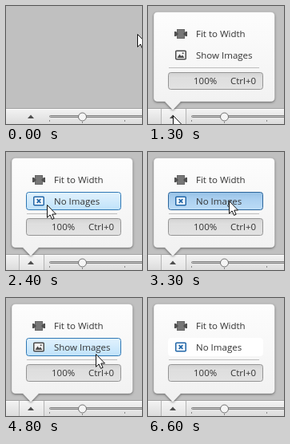
An HTML page that plays this animation: 170 by 148 pixels, repeating every 6900 ms.

```html
<!DOCTYPE html>
<html lang="en">
<head>
<meta charset="utf-8">
<title>Zoom popup</title>
<style>
  html, body { margin: 0; width: 100%; height: 100%; overflow: hidden; background: #c0c0c0; }
  svg { display: block; width: 170px; height: 148px; }
  text { font: 11.5px "Open Sans", "Noto Sans", sans-serif; fill: #333; }
  #bubble { filter: drop-shadow(0 1px 1.5px rgba(0, 0, 0, .5)); }
  .box { stroke: #949494; fill: url(#well); }
  .box.hover { stroke: #5b8db5; fill: url(#soft); }
  #row { stroke: none; fill: none; }
  #row.plain { stroke: #fff; fill: #fff; }
  #row.hover { stroke: #2f78b4; fill: url(#light); }
  #row.hot { stroke: #2b659b; fill: #b9dcf8; }
  #row.press { stroke: #2b659b; fill: url(#blue); }
  .mode { display: none; }
</style>
</head>
<body>
<svg viewBox="0 0 170 148">
  <defs>
    <linearGradient id="bar" x2="0" y2="1">
      <stop stop-color="#f4f4f4"/><stop offset="1" stop-color="#dcdcdc"/>
    </linearGradient>
    <linearGradient id="paper" x2="0" y2="1">
      <stop stop-color="#fdfdfd"/><stop offset="1" stop-color="#f1f1f1"/>
    </linearGradient>
    <linearGradient id="well" x2="0" y2="1">
      <stop stop-color="#d2d2d2"/><stop offset=".3" stop-color="#dedede"/><stop offset="1" stop-color="#e2e2e2"/>
    </linearGradient>
    <linearGradient id="light" x2="0" y2="1">
      <stop stop-color="#e2f2fd"/><stop offset="1" stop-color="#bfe2fa"/>
    </linearGradient>
    <linearGradient id="blue" x2="0" y2="1">
      <stop stop-color="#98c2e6"/><stop offset=".4" stop-color="#abd0f0"/><stop offset="1" stop-color="#bcdcf6"/>
    </linearGradient>
    <linearGradient id="soft" x2="0" y2="1">
      <stop stop-color="#a0c6e2"/><stop offset="1" stop-color="#c0dbef"/>
    </linearGradient>
  </defs>

  <rect width="170" height="148" fill="#c0c0c0"/>
  <rect y="128" width="170" height="20" fill="url(#bar)"/>
  <path d="M0 128.5H170" stroke="#a2a2a2"/>
  <path d="M0 129.5H170" stroke="#fafafa"/>
  <g id="button">
    <rect x="17" y="129" width="30" height="19" fill="#fff" opacity=".2"/>
    <path d="M16.5 129V148M47.5 129V148" stroke="#b4b4b4"/>
  </g>
  <path d="M27 141L31 136.5L35 141Z" fill="#4d4d4d"/>
  <rect x="54.5" y="137.5" width="120" height="2" rx="1" fill="#c4c4c4" stroke="#808080"/>
  <path d="M54.5 143V145M95.5 145V147M148.5 143V145" stroke="#888"/>
  <circle cx="95.5" cy="139" r="5" fill="#f5f5f5" stroke="#6f6f6f"/>

  <g id="popup">
    <path id="bubble" fill="url(#paper)" stroke="#fff" stroke-width=".6"
      d="M12 8H153.500Q158 8 158 12.500V115Q158 119.500 153.500 119.500H41L31 130L21 119.500H12Q7.500 119.500 7.500 115V12.500Q7.500 8 12 8Z"/>
    <rect x="36.500" y="29.500" width="9" height="11" fill="#777" stroke="#666"/>
    <path d="M33 32H35L38 35L35 38H33ZM49 32H47L44 35L47 38H49Z" fill="#505050"/>
    <text x="60" y="39">Fit to Width</text>

    <rect id="row" x="25.500" y="50.500" width="118" height="22" rx="3"/>
    <g class="mode">
      <rect x="34.750" y="56.250" width="12.500" height="10.500" rx="1" fill="#f4f4f4" stroke="#4c4c4c" stroke-width="1.500"/>
      <path d="M36.500 65L39.500 60.500L41.500 63L43 61.500L45.500 65Z" fill="#4c4c4c"/>
      <circle cx="43.700" cy="59.200" r="1" fill="#4c4c4c"/>
      <text x="60" y="66">Show Images</text>
    </g>
    <g class="mode">
      <rect x="34.750" y="56.250" width="12.500" height="10.500" rx="1" fill="#f2f8fd" stroke="#2367a8" stroke-width="1.500"/>
      <path d="M38.700 59.200L43.300 63.800M43.300 59.200L38.700 63.800" stroke="#2367a8" stroke-width="1.700"/>
      <text x="60" y="66">No Images</text>
    </g>
    <g class="mode">
      <rect x="34.750" y="56.250" width="12.500" height="10.500" rx="1" fill="#d8ebfa" stroke="#1d63ab" stroke-width="1.500"/>
      <path d="M36 66V64L39.500 60L41.500 62.500L43 61L46 64.500V66Z" fill="#1d63ab"/>
      <circle cx="43.700" cy="59.200" r="1.100" fill="#1d63ab"/>
      <text x="60" y="66">Cached Images</text>
    </g>

    <path d="M26 77.500H139" stroke="#bdbdbd"/>
    <rect id="zoom" class="box" x="25.500" y="83.500" width="118" height="21" rx="3"/>
    <text x="57" y="98">100%</text>
    <text x="103" y="98">Ctrl+0</text>
  </g>

  <path id="cursor" fill="#fff" stroke="#111" stroke-linejoin="round"
    d="M.5 .5V16.300L4.100 12.900L6.500 18.400L9.100 17.300L6.800 12H11.500Z"/>
</svg>

<script>
  const LOOP = 6900, TICK = 100;
  const $ = id => document.getElementById(id);
  const modes = document.querySelectorAll(".mode");
  const smooth = u => u * u * (3 - 2 * u);
  const easeOut = u => 1 - (1 - u) ** 3;

  // first tick, number of ticks, end x, end y, easing
  const moves = [
    [100, 7, 31, 137, smooth],
    [1500, 7, 51, 66, easeOut],
    [2800, 4, 101, 61, smooth],
    [4000, 2, 110, 70, easeOut],
    [4300, 2, 112, 70, easeOut],
    [6000, 3, 104, 64, smooth]
  ];
  // time, row style, mode: 0 show, 1 none, 2 cached
  const states = [
    [0, "", 0], [1900, "hover", 0],
    [2200, "press", 0], [2300, "hot", 0], [2400, "hover", 1],
    [3300, "press", 1], [3400, "hot", 1], [3500, "hover", 2],
    [4700, "press", 2], [4800, "hover", 0],
    [5900, "hot", 0], [6200, "hover", 0],
    [6400, "press", 0], [6500, "hot", 0], [6600, "plain", 1]
  ];

  function cursorAt(t) {
    let x = 164, y = 35;
    for (const [start, count, endX, endY, ease] of moves) {
      if (t < start) break;
      const u = ease(Math.min(1, ((t - start) / TICK + 1) / count));
      x += (endX - x) * u;
      y += (endY - y) * u;
    }
    return [Math.round(x), Math.round(y)];
  }

  function draw(now) {
    const t = Math.floor(now % LOOP / TICK) * TICK;
    const [, style, mode] = states.findLast(s => s[0] <= t);

    $("cursor").setAttribute("transform", `translate(${cursorAt(t)})`);
    $("cursor").style.opacity = t < 6600 ? 1 : 0;
    $("button").style.opacity = t < 600 ? 0 : 1;
    $("popup").style.opacity = Math.max(0, Math.min(1, (t - 700) / 600));
    $("row").setAttribute("class", style);
    $("zoom").setAttribute("class", t >= 1600 && t < 1900 ? "box hover" : "box");
    modes.forEach((g, i) => g.style.display = i === mode ? "inline" : "none");
  }

  const begin = performance.now();
  function frame() {
    draw(performance.now() - begin);
    requestAnimationFrame(frame);
  }
  frame();
</script>
</body>
</html>
```
